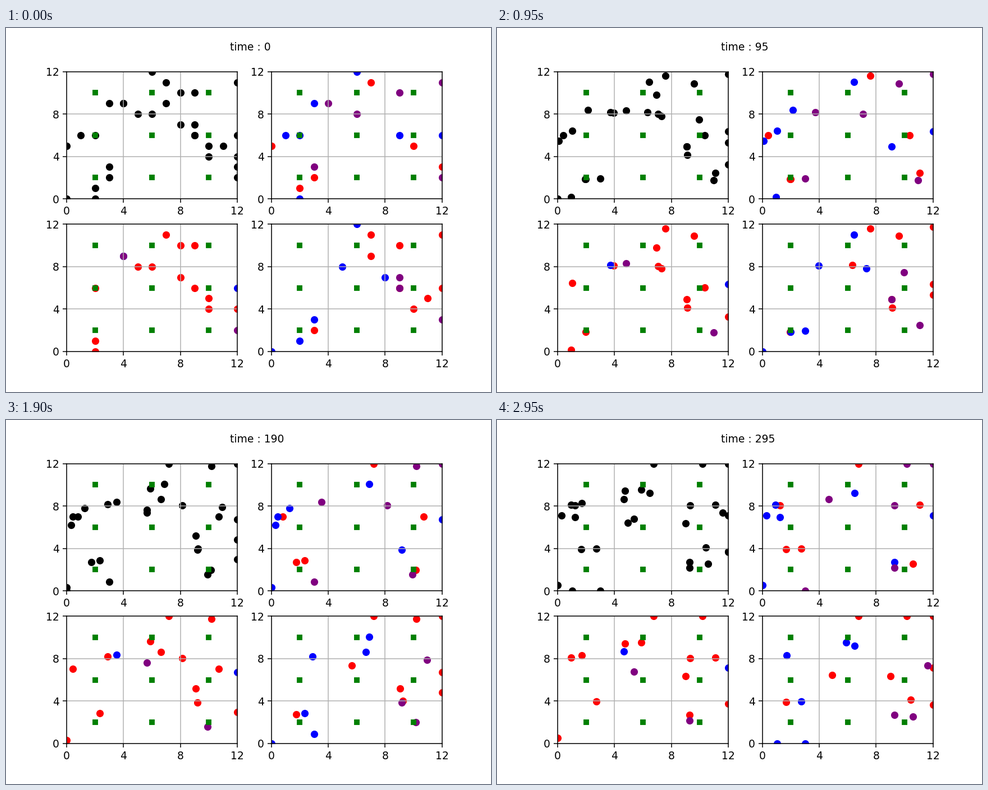
Recreate the animation shown at these times as a matplotlib script. Size 864 by 648 pixels, loop 3000 ms.

```python
import numpy as np
import matplotlib.pyplot as plt
from matplotlib.animation import FuncAnimation

FRAMES, STEP = 60, 5
SIDE, SPEED = 12, 0.0112
COLORS = {"r": "red", "b": "blue", "p": "purple"}

# Everyone starts on a grid node and walks at the same speed.
# Colour in panels 2-4 ("-" is absent), node, heading in degrees, (time, new heading).
WALKERS = [
    ("--b", 0, 0, 180, (204, 0)),
    ("br-", 2, 0, 171),
    ("rrb", 2, 1, 153, (28, 70)),
    ("r-r", 3, 2, 189, (108, 94)),
    ("p-b", 3, 3, 270),
    ("r--", 0, 5, 68),
    ("b--", 1, 6, 210, (95, 135), (155, 39)),
    ("br-", 2, 6, 156, (163, 66)),
    ("b--", 3, 9, 215),
    ("pb-", 4, 9, 263, (78, 170), (150, 14)),
    ("-p-", 4, 9, -40, (220, 231)),
    ("-rb", 5, 8, 175),
    ("pr-", 6, 8, 1),
    ("b-b", 6, 12, -66, (232, 217)),
    ("rrr", 7, 11, 26, (70, 112)),
    ("--r", 7, 9, 231),
    ("-r-", 8, 10, 190),
    ("-rb", 8, 7, 130),
    ("prr", 9, 10, 56, (228, 110)),
    ("--p", 9, 7, 25, (225, -64)),
    ("--r", 9, 6, -86, (180, 5)),
    ("brp", 9, 6, -85),
    ("-rr", 10, 4, 184, (78, 93)),
    ("rr-", 10, 5, 71),
    ("--r", 11, 5, 18, (133, 270)),
    ("p-r", 12, 11, 46),
    ("bbr", 12, 6, 20),
    ("-r-", 12, 4, -44, (162, 42)),
    ("r-p", 12, 3, 210, (185, 163), (217, 34)),
    ("pp-", 12, 2, 192, (228, 108)),
]


def walk(x, y, heading, *turns):
    """Position at every shown time; the walls stop a walker."""
    turns = dict(turns)
    spot, trail = np.array([x, y], float), []
    for t in range(FRAMES * STEP):
        if t % STEP == 0:
            trail.append(spot)
        heading = turns.get(t, heading)
        a = np.radians(heading)
        spot = np.clip(spot + SPEED * np.array([np.cos(a), np.sin(a)]), 0, SIDE)
    return trail


codes = [code for code, *_ in WALKERS]
trails = np.array([walk(*route) for _, *route in WALKERS])

fig, axes = plt.subplots(2, 2, figsize=(6.4, 4.8), dpi=135)
fig.subplots_adjust(left=.1249, right=.899, bottom=.1114, top=.8802)
panels = axes.ravel()
layers = []


def add_layer(ax, members, color):
    layers.append((ax.scatter([], [], s=36, color=color), members))


add_layer(panels[0], list(range(len(WALKERS))), "black")
for k, ax in enumerate(panels[1:]):
    for key, color in COLORS.items():
        add_layer(ax, [i for i, code in enumerate(codes) if code[k] == key], color)

posts_x, posts_y = np.meshgrid([2, 6, 10], [2, 6, 10])
ticks = range(0, SIDE + 1, 4)
for ax in panels:
    ax.plot(posts_x.ravel(), posts_y.ravel(), "s", color="green", markersize=4)
    ax.set(xlim=(0, SIDE), ylim=(0, SIDE), xticks=ticks, yticks=ticks)
    ax.grid(True)

clock = panels[0].text(11.5, 14, "")


def update(frame):
    for dots, members in layers:
        dots.set_offsets(trails[members, frame])
    clock.set_text(f"time : {frame * STEP}")
    return [dots for dots, _ in layers] + [clock]


anim = FuncAnimation(fig, update, frames=FRAMES, interval=50, repeat=True)
plt.show()
```
